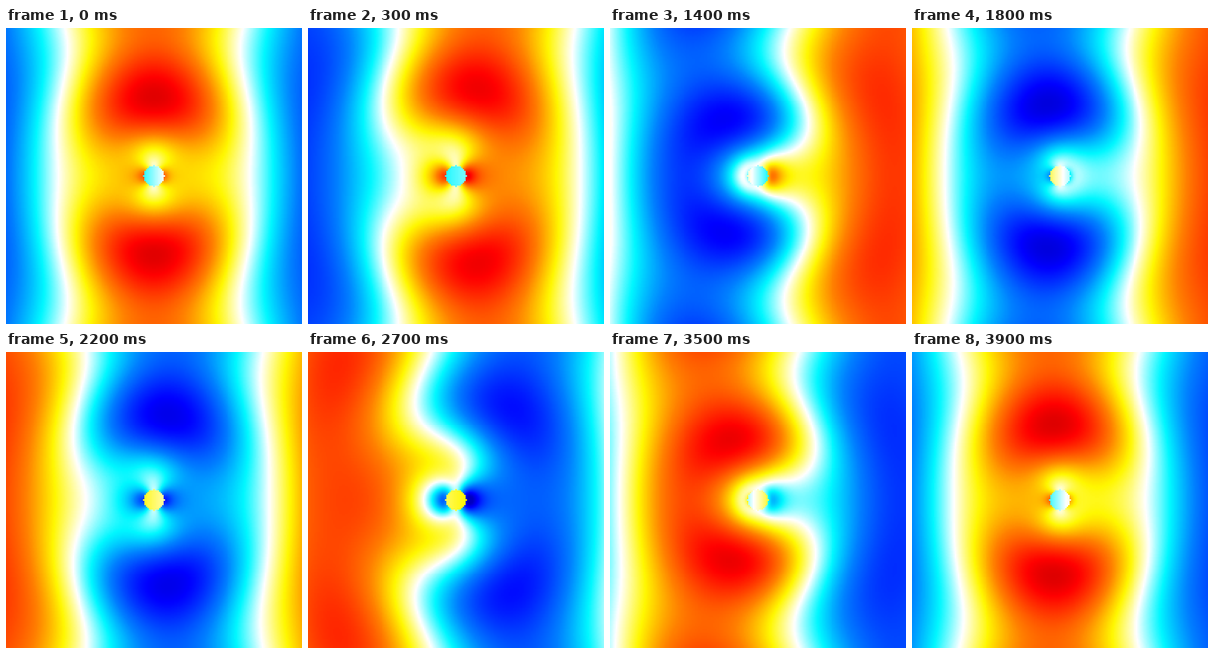
A matplotlib script that plays this animation: 400 px wide and 400 px high, repeating every 4 s.

```python
import numpy as np
import matplotlib.pyplot as plt
from matplotlib.animation import FuncAnimation
from matplotlib.colors import LinearSegmentedColormap

SIZE, CELLS, FRAMES = 400, 201, 40
AMP = 0.68            # incident amplitude
K_IN = 2 * np.pi / 503
K_SC = 0.0345         # wavenumber of the scattered wave
RADIUS = 14


def hankel(z):
    """Hankel functions of order 0 and 1 from their integral forms."""
    n = 3000
    t = (np.arange(n) + 0.5) * np.pi / (2 * n)
    zz = z[:, None]
    wave = np.cos(zz * np.cos(t))
    j0 = wave.mean(axis=1)
    y0 = 2 / np.pi * (wave * (np.euler_gamma + np.log(2 * zz * np.sin(t) ** 2))).mean(axis=1)
    h0 = j0 + 1j * y0
    return h0, -np.gradient(h0, z)


def complex_field():
    axis = (np.arange(CELLS) + 0.5) * SIZE / CELLS - SIZE / 2
    x, y = np.meshgrid(axis, axis)
    r = np.maximum(np.hypot(x, y), 1)
    cos = x / r
    cos2 = cos ** 2

    z = np.linspace(0.3, 11, 500)
    kr = np.clip(K_SC * r, 0.4, 10.5)
    h0, h1 = (np.interp(kr, z, h) for h in hankel(z))

    # Transverse part above and below, longitudinal part left and right.
    far = (1 + (r / 130) ** 3) ** -0.4
    across = h0 * far + 0.2j * (20 / r) ** 2
    along = h1 / kr / (1 + (18 / r) ** 4) * (1 + 4 * cos / r)
    outside = AMP * (np.exp(1j * K_IN * x) - (1 - cos2) * across - cos2 * along)

    u = x / RADIUS
    inside = -0.1 - 0.18j + u * (0.1 - 0.1j)
    return np.where(r <= RADIUS, inside, outside)


def make_cmap():
    """Warm colours for positive values, mirrored to blue for negative ones."""
    warm = [(0.25, (1, 0.97, 0)), (0.5, (1, 0.5, 0)),
            (0.83, (1, 0, 0)), (1, (0.75, 0, 0))]
    cold = [(-v, c[::-1]) for v, c in reversed(warm)]
    stops = cold + [(0, (1, 1, 1))] + warm
    return LinearSegmentedColormap.from_list(
        "field", [((v + 1) / 2, c) for v, c in stops], N=512)


field = complex_field()

fig = plt.figure(figsize=(4, 4), dpi=100)
ax = fig.add_axes([0, 0, 1, 1])
ax.axis("off")
image = ax.imshow(field.real, cmap=make_cmap(), vmin=-1, vmax=1,
                  interpolation="nearest", aspect="auto")


def draw(i):
    phase = 2 * np.pi * i / FRAMES
    image.set_data((field * np.exp(-1j * phase)).real)
    return [image]


anim = FuncAnimation(fig, draw, frames=FRAMES, interval=100, repeat=True)
plt.show()
```
